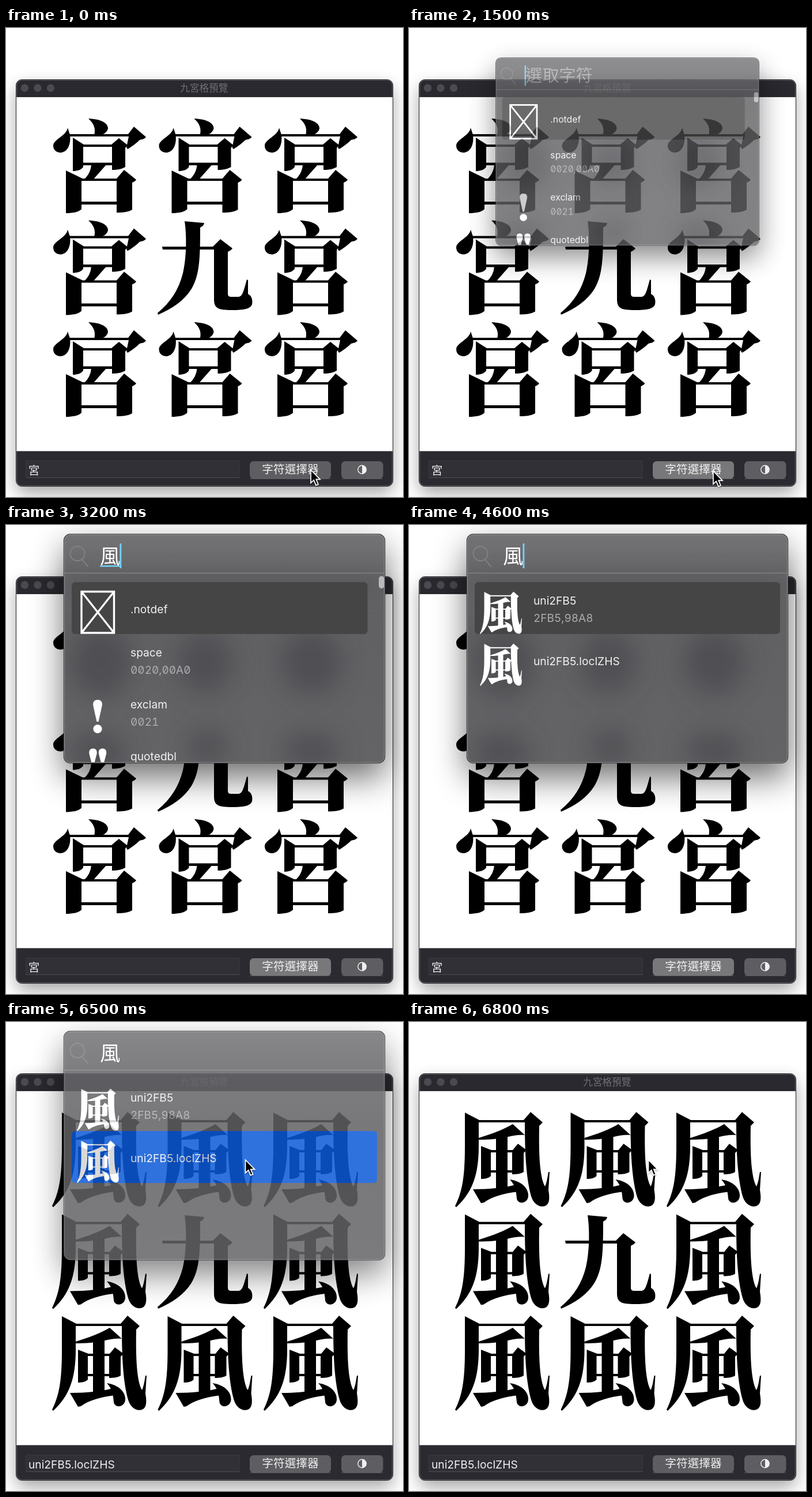
Recreate the animation shown at these times as an HTML page. Size 689 by 813 pixels, loop 7.41 s.

```html
<!DOCTYPE html>
<html lang="zh-Hant">
<head>
<meta charset="utf-8">
<title>九宮格預覽</title>
<style>
html, body { margin: 0; width: 100%; height: 100%; overflow: hidden; background: #fff; }
svg { display: block; width: 100vw; height: 100vh; }
text { font-family: Inter, "Noto Sans CJK TC", "Noto Sans CJK JP", "Noto Sans CJK", sans-serif; }
.name { font-size: 19.2px; fill: #f1f1f1; }
.code { font-size: 19px; fill: #adadb0; font-feature-settings: "zero", "tnum"; }
.big { font-size: 35.5px; font-weight: 300; }
.ui { font-size: 19.7px; fill: #f0f0f0; }
#field { font-size: 19.2px; }
</style>
</head>
<body>
<svg viewBox="0 0 689 813">
  <defs>
    <filter id="winShade" x="-20%" y="-20%" width="140%" height="140%"><feGaussianBlur stdDeviation="15"/></filter>
    <filter id="popShade" x="-30%" y="-40%" width="160%" height="180%"><feGaussianBlur stdDeviation="29"/></filter>
    <filter id="soft" x="-80%" y="-80%" width="260%" height="260%"><feGaussianBlur stdDeviation="22"/></filter>
    <filter id="tipShade" x="-50%" y="-50%" width="200%" height="200%"><feDropShadow dx="0" dy="1.5" stdDeviation="1.2" flood-opacity=".4"/></filter>
    <linearGradient id="glass" x1="0" y1="0" x2="0" y2="1">
      <stop offset="0" stop-color="#737376"/><stop offset=".17" stop-color="#68686b"/>
      <stop offset=".4" stop-color="#616164"/><stop offset="1" stop-color="#646467"/>
    </linearGradient>
    <clipPath id="winClip"><rect x="17.500" y="89.500" width="654" height="705" rx="10"/></clipPath>
    <clipPath id="popClip"><rect x="100.500" y="16" width="557" height="396.500" rx="11"/></clipPath>

    <g id="gong">
      <path d="M143 157C166 158 177 165 177 174C176 181 168 186 160 186H153C156 175 153 166 143 157Z"/>
      <path d="M107 173C105 187 82 193 82 204C82 212 88 216 95 216C107 215 113 202 111 185Z"/>
      <path d="M109 184H212L222 171L243 189C240 193 236 193 232 194C225 201 219 205 211 210L209 207L213 188H109Z"/>
      <path d="M116 190L135 202H183L196 191L211 203L207 208V241C202 244 194 246 184 246V238H134V241C130 246 124 248 116 248ZM134 206V233.500H184V206Z" fill-rule="evenodd"/>
      <path d="M148 237H174L151 263H135Q147 252 148 237Z"/>
      <path d="M104 247L133 261H192L205 246L226 263C224 266 221 267 219 268V315C212 319 204 320 192 320V306H131V314C126 319 116 321 104 321ZM131 265V301H192V265Z" fill-rule="evenodd"/>
    </g>
    <g id="jiu">
      <path d="M310 335L344 338C343 343 340 344 337 346C337 400 336 428 322 452C309 473 289 486 264 497L263 494C286 475 300 453 307 425C313 400 314 362 310 335Z"/>
      <path d="M271 379H359L372 366L393 382C391 385 388 386 385 388V460C385 465 387 466 392 466H403C410 466 412 458 418 436L420 437V461C428 465 428 474 427 479C424 487 413 489 392 489C368 489 361 486 361 470V384H272Z"/>
    </g>
    <g id="feng">
      <path d="M97 157L122 170H199L211 156L232 174L226 180C225 230 227 270 236 285C239 279 240 271 242 260H244L242 291C245 308 243 316 236 319C226 322 216 315 212 302C203 270 201 225 201 174H121V215C121 265 110 295 82 321L80 319C92 295 97 270 97 215Z"/>
      <path d="M121 201C144 194 165 186 180 177L201 196C190 195 181 197 172 199C155 203 139 204 121 204Z"/>
      <path d="M125 215L143 222H180L189 211L204 222L199 227V260C194 263 188 264 179 264V261H142V267C138 271 132 272 125 272ZM142 226V257H179V226Z" fill-rule="evenodd"/>
      <path d="M151 197H171V290H151Z"/>
      <path d="M111 290C140 290 168 287 190 281V294C164 297 143 303 130 313L125 314Z"/>
      <path d="M175 273C196 276 208 289 207 302C206 315 189 317 187 306C186 294 185 284 175 273Z"/>
    </g>
  </defs>

  <rect width="689" height="813" fill="#fff"/>

  <rect x="18" y="102" width="653" height="704" rx="12" opacity=".36" filter="url(#winShade)"/>
  <g clip-path="url(#winClip)">
    <rect x="17" y="89" width="655" height="706" fill="#fff"/>
    <rect x="17" y="89" width="655" height="30.500" fill="#2a292f"/>
    <rect x="17" y="118.500" width="655" height="1" fill="#111"/>
    <rect x="17" y="733.500" width="655" height="62" fill="#2b2a31"/>
  </g>
  <g fill="#4b4a4f"><circle cx="32.500" cy="104" r="6.700"/><circle cx="55" cy="104" r="6.700"/><circle cx="77.500" cy="104" r="6.700"/></g>
  <text x="343.800" y="109.800" font-size="16.600" text-anchor="middle" fill="#716f75">九宮格預覽</text>
  <g id="grid"></g>

  <rect x="34" y="750.500" width="371.500" height="29.500" fill="#313037"/>
  <path d="M34 779.500H405.500" stroke="#4d4c52"/>
  <path d="M34 750.500H405.500M34.500 750V780M405 750V780" stroke="#39383f"/>
  <text id="field" class="ui" x="39" y="774">宮</text>
  <rect id="pick" x="423" y="751" width="141" height="30.500" rx="6.500" fill="#5e5d61"/>
  <text class="ui" x="493.500" y="772.300" text-anchor="middle" font-weight="500">字符選擇器</text>
  <rect x="582" y="751" width="72.500" height="30.500" rx="6.500" fill="#5e5d61"/>
  <path d="M423 781.300H564M582 781.300H654" stroke="#77767a" stroke-width=".6"/>
  <circle cx="618" cy="765.500" r="7.200" fill="none" stroke="#f0f0f0" stroke-width="1.400"/>
  <path d="M618 758.300A7.200 7.200 0 0 1 618 772.700Z" fill="#f0f0f0"/>
  <rect x="17.500" y="89.500" width="654" height="705" rx="10" fill="none" stroke="#1f1e23"/>
  <rect x="18.500" y="90.500" width="652" height="703" rx="9" fill="none" stroke="#fff" stroke-opacity=".28"/>

  <g id="pop">
    <rect x="101" y="40" width="557" height="397" rx="14" opacity=".58" filter="url(#popShade)"/>
    <g clip-path="url(#popClip)">
      <rect x="100" y="15" width="559" height="399" fill="url(#glass)"/>
      <g id="blobs" filter="url(#soft)" fill="#414145" opacity=".55">
        <ellipse cx="165" cy="238" rx="52" ry="62"/><ellipse cx="345" cy="238" rx="48" ry="52"/>
        <ellipse cx="530" cy="238" rx="52" ry="56"/><ellipse cx="160" cy="395" rx="50" ry="35"/>
        <ellipse cx="350" cy="385" rx="35" ry="30"/><ellipse cx="530" cy="392" rx="50" ry="32"/>
        <rect x="100" y="92" width="560" height="24"/>
      </g>
      <path d="M101 83.300H658" stroke="#929295"/>
      <g fill="none" stroke="#828285" stroke-width="1.800"><circle cx="124" cy="49.500" r="12.500"/><path d="M132 60L142.500 72.500"/></g>
      <text id="hint" class="big" x="163.500" y="66" fill="#a9a9ac">選取字符</text>
      <text id="typed" class="big" x="163" y="66.500" fill="#fff"></text>
      <rect id="under" x="163" y="70" height="2.500" fill="#74d3f6"/>
      <rect id="caret" y="32" width="2.800" height="43" fill="#74d3f6"/>
      <rect id="row" x="114" height="90" rx="6"/>

      <g id="all">
        <path d="M131 115.500H187.500V187H131ZL187.500 187M187.500 115.500L131 187" fill="none" stroke="#fff" stroke-width="3.400"/>
        <text class="name" x="216" y="153">.notdef</text>
        <text class="name" x="216" y="228">space</text><text class="code" x="216" y="258">0020,00A0</text>
        <path d="M159 303C165 303 168 307 166.500 314L160.500 341H157.500L151.500 314C150 307 153 303 159 303Z" fill="#fff"/>
        <circle cx="159" cy="353.500" r="7.600" fill="#fff"/>
        <text class="name" x="216" y="318">exclam</text><text class="code" x="216" y="348">0021</text>
        <g fill="#fff">
          <path id="tick" d="M151 387.500C156 387.500 158.500 391 157.500 397L152.500 416H149.500L144.500 397C143.500 391 146 387.500 151 387.500Z"/>
          <use href="#tick" x="16.500"/>
        </g>
        <text class="name" x="216" y="408">quotedbl</text>
      </g>
      <rect id="bar" x="647" y="88.500" width="9.500" height="21.500" rx="4.700" fill="#b9b9bb"/>

      <g id="found">
        <use href="#feng" transform="translate(87.400 46.200) scale(.445)" fill="#fff"/>
        <use href="#feng" transform="translate(87.400 136.200) scale(.445)" fill="#fff"/>
        <text class="name" x="216" y="138">uni2FB5</text><text class="code" x="216" y="168">2FB5,98A8</text>
        <text class="name" x="216" y="243">uni2FB5.loclZHS</text>
      </g>
    </g>
    <rect x="100.500" y="16" width="557" height="396.500" rx="11" fill="none" stroke="#323235" stroke-width="1.400"/>
    <rect x="101.300" y="16.800" width="555.400" height="394.900" rx="10.500" fill="none" stroke="#a0a0a3" stroke-width=".9"/>
  </g>

  <g id="tip" filter="url(#tipShade)">
    <path d="M0 0V22.500L5.200 17.700L9 26.700L12.900 25L9.200 16.300H16Z" stroke="#fff" stroke-width="1.700"/>
  </g>
</svg>
<script>
const LOOP = 7410, STEP = 100;
const $ = id => document.getElementById(id);
const show = (id, on) => $(id).setAttribute("display", on ? "inline" : "none");
const set = (id, attrs) => { for (const k in attrs) $(id).setAttribute(k, attrs[k]); };

const cells = [];
for (let i = 0; i < 9; i++) {
  const use = document.createElementNS("http://www.w3.org/2000/svg", "use");
  if (i === 4) use.setAttribute("href", "#jiu");
  else {
    use.setAttribute("x", i % 3 * 183.5);
    use.setAttribute("y", Math.floor(i / 3) * 176.5);
    cells.push(use);
  }
  $("grid").append(use);
}

// pointer: time, x, y; a null x hides it
const pointer = [
  [0, 529, 766], [100, null], [600, 481, 411], [700, 528, 768], [1700, 528, 768],
  [2100, 545, 752], [2500, 541, 726], [2800, null],
  [5100, 519, 556], [5600, 415.5, 239]
];
// popup: time, scale, opacity
const popup = [
  [0, 1, 0], [1400, .289, .36], [1500, .82, .8], [1600, 1, 1],
  [6500, 1, .85], [6600, 1, .557], [6700, 1, .2], [6800, 1, 0]
];
const typing = [[0, ""], [2800, "ㄈ"], [3000, "ㄈㄥ"], [3200, "風"]];
const caretOff = [1800, 2300, 2500, 4800, 5300, 5800];

const last = (table, t) => table.findLastIndex(r => r[0] <= t);
const ease = u => u * u * (3 - 2 * u);

function drawPointer(t) {
  const i = last(pointer, t), [t0, x, y] = pointer[i], next = pointer[i + 1];
  show("tip", x !== null);
  if (x === null) return;
  const glide = next && next[1] !== null && t >= 1700;
  const u = glide ? ease((t - t0) / (next[0] - t0)) : 0;
  const px = glide ? x + (next[1] - x) * u : x;
  const py = glide ? y + (next[2] - y) * u : y;
  set("tip", { transform: `translate(${px} ${py})` });
}

function drawPopup(t) {
  const [, scale, alpha] = popup[last(popup, t)];
  show("pop", alpha > 0);
  set("pop", {
    opacity: alpha,
    transform: `translate(379 214.500) scale(${scale}) translate(-379 -214.500)`
  });
  show("blobs", t < 6500);

  const text = typing[last(typing, t)][1];
  const width = text.length * 35.5;
  $("typed").textContent = text;
  show("hint", !text);
  show("under", text && t < 4400);
  set("under", { width });
  set("caret", { x: text ? 162 + width : 161.5 });
  show("caret", t < 6400 && !caretOff.includes(t));

  const found = t >= 4500, chosen = t >= 6300;
  show("all", !found);
  show("found", found);
  show("bar", t < 4600);
  set("row", {
    y: chosen ? 189 : 99,
    width: t < 4600 ? 513.5 : 530,
    fill: chosen ? "#0c5ad8" : "#454546"
  });
}

function draw(ms) {
  const t = Math.floor(ms % LOOP / STEP) * STEP;
  const swapped = t >= 6500;
  cells.forEach(c => c.setAttribute("href", swapped ? "#feng" : "#gong"));
  $("field").textContent = swapped ? "uni2FB5.loclZHS" : "宮";
  set("pick", { fill: t >= 1200 && !swapped ? "#78777a" : "#5e5d61" });
  drawPopup(t);
  drawPointer(t);
}

const start = performance.now();
function tick() {
  draw(performance.now() - start);
  requestAnimationFrame(tick);
}
tick();
</script>
</body>
</html>
```
